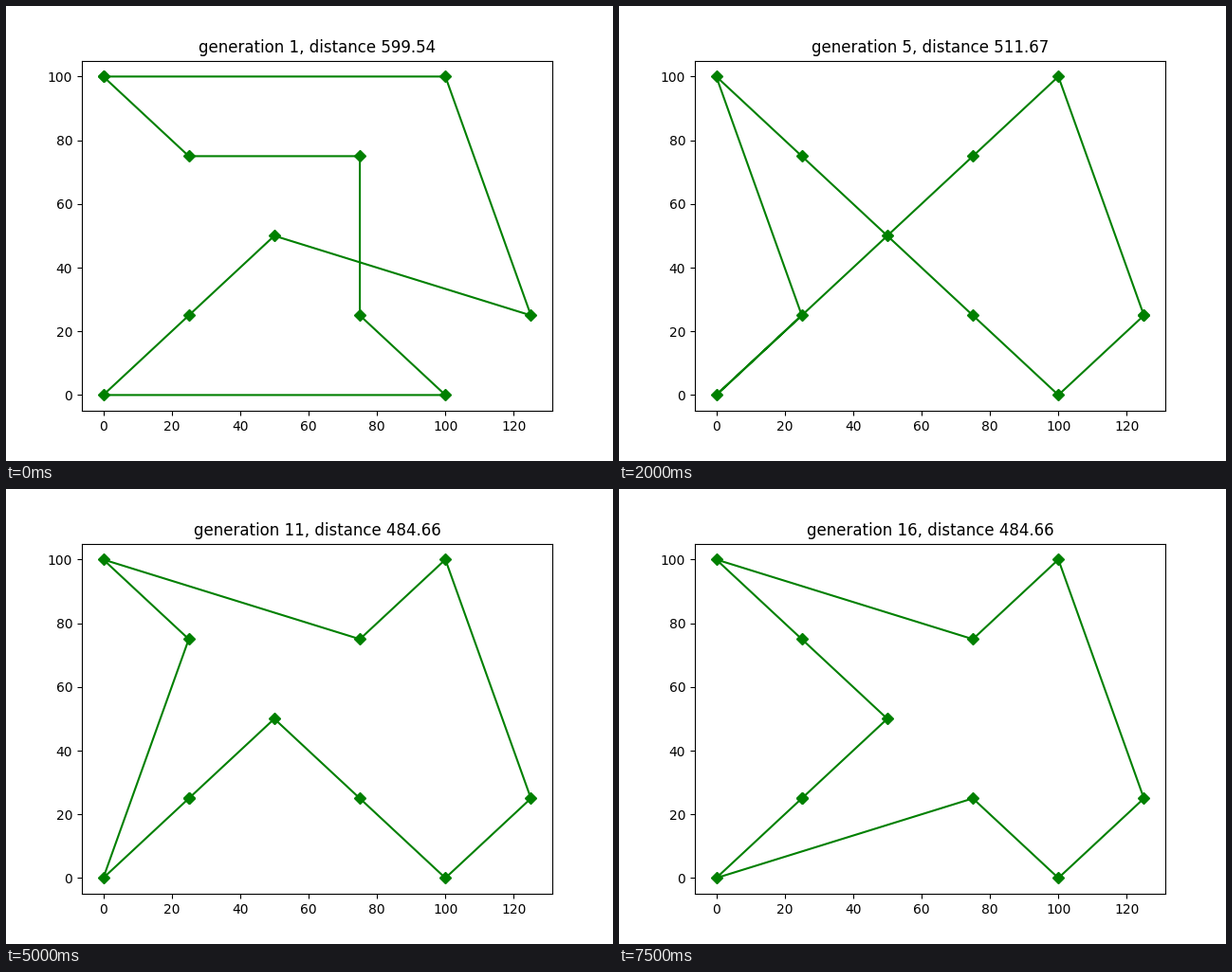
Animation of 640x480 px, one loop 8000 ms. Source, as a matplotlib script:

```python
import matplotlib.pyplot as plt
import numpy as np
from matplotlib.animation import FuncAnimation

GENERATIONS = 16
STEP_MS = 500

# Cities sit on the two diagonals of a square, plus one outlier.
rising = [(k, k) for k in (100, 75, 50, 0, 25)]
falling = [(k, 100 - k) for k in (0, 25, 75, 100)]
cities = np.array([(125, 25), *rising, *falling])


def mutate(tour, *moves, start=0):
    """Rotate a tour to begin at `start`, then move cities between slots."""
    tour = tour[start:] + tour[:start]
    for src, dst in moves:
        tour.insert(dst, tour.pop(src))
    return tour


zigzag = list(range(len(cities)))
spiral = mutate(zigzag, (4, 9), (4, 9), (4, 2), (5, 7), start=6)
crossed = mutate(zigzag, (8, 9))
spike = mutate(zigzag, (1, 7), (1, 8), start=5)
notch_left = mutate(spike, (7, 9), (8, 1))
notch_below = mutate(spike, (7, 1))

# Best tour and the generation in which it takes over.
best = {1: spiral, 2: crossed, 3: spike, 5: zigzag,
        7: notch_left, 11: notch_below, 12: notch_left}


def closed_path(generation):
    tour = best[max(g for g in best if g <= generation)]
    return cities[tour + tour[:1]]


def length(path):
    return np.hypot(*np.diff(path, axis=0).T).sum()


fig, ax = plt.subplots(figsize=(6.4, 4.8), dpi=100)
line, = ax.plot(*closed_path(1).T, "gD-")


def update(i):
    generation = i + 1
    path = closed_path(generation)
    line.set_data(*path.T)
    title = ax.set_title(f"generation {generation}, distance {length(path):.2f}")
    return line, title


anim = FuncAnimation(fig, update, frames=GENERATIONS, interval=STEP_MS,
                     repeat=True, repeat_delay=0, blit=False)
plt.show()
```
